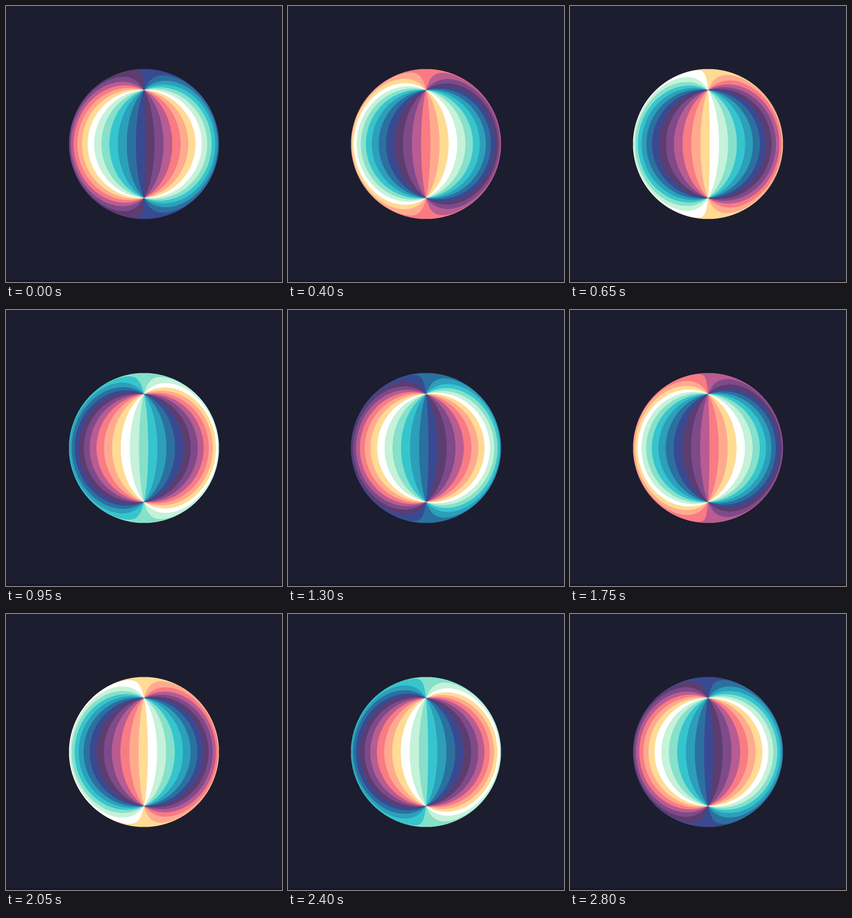
An HTML page with a canvas for the animation above (2.85 s loop, 480 by 480 pixels).

```html
<!DOCTYPE html>
<html lang="en">
<head>
<meta charset="utf-8">
<title>Striped mirror ball</title>
<style>
  html, body { margin: 0; width: 100%; height: 100%; overflow: hidden; background: #1c1d2f; }
  canvas { display: block; width: 480px; height: 480px; }
</style>
</head>
<body>
<canvas id="stage" width="480" height="480"></canvas>
<script>
const SIZE = 480, MID = SIZE / 2, RADIUS = 130.5;
const STEP_MS = 50, STEPS = 57;
const SUB = 3, SAMPLES = SUB * SUB;
const CAMERA = 20;       // camera distance in ball radii
const PHASE = -0.12;     // start offset in stripes
const BACK = '#1c1d2f', FOOT = '#1b1328';
const rgb = hex => [1, 3, 5].map(i => parseInt(hex.slice(i, i + 2), 16));
const backRgb = rgb(BACK);
const palette = [
  '#5c3d70', '#7e4a8a', '#b85c92', '#f97b84', '#ffaa8f', '#ffdb94', '#ffffff',
  '#c5f2d9', '#86e0ca', '#36c5cd', '#2c9fbb', '#2a719f', '#394a92'
].map(rgb);
const N = palette.length;

const ctx = document.getElementById('stage').getContext('2d');
ctx.fillStyle = BACK;
ctx.fillRect(0, 0, SIZE, SIZE);
ctx.fillStyle = FOOT;
ctx.fillRect(0, 477, SIZE, 3);

// Longitude, in stripes, of the ray mirrored by the ball; NaN off the ball.
function stripeAt(px, py) {
  const scale = 1 / (RADIUS * Math.sqrt(CAMERA * CAMERA - 1));
  const u = (px - MID) * scale, v = (py - MID) * scale;
  const len = Math.sqrt(u * u + v * v + 1);
  const dx = u / len, dy = v / len, dz = -1 / len;
  const b = CAMERA * dz;
  const disc = b * b - CAMERA * CAMERA + 1;
  if (disc < 0) return NaN;
  const t = -b - Math.sqrt(disc);
  const nx = t * dx, ny = t * dy, nz = CAMERA + t * dz;
  const k = 2 * (dx * nx + dy * ny + dz * nz);
  return Math.atan2(dx - k * nx, dz - k * nz) * N / Math.PI;
}

const left = Math.floor(MID - RADIUS) - 1;
const side = SIZE - 2 * left;
const image = ctx.createImageData(side, side);
const stripes = new Float32Array(side * side * SAMPLES);
for (let i = 0; i < stripes.length; i++) {
  const pixel = Math.floor(i / SAMPLES), s = i % SAMPLES;
  const x = left + pixel % side + (s % SUB + 0.5) / SUB;
  const y = left + Math.floor(pixel / side) + (Math.floor(s / SUB) + 0.5) / SUB;
  stripes[i] = stripeAt(x, y);
}

function draw(step) {
  const shift = step * 2 * N / STEPS + PHASE + 2 * N;
  for (let p = 0, i = 0; p < image.data.length; p += 4) {
    let r = 0, g = 0, b = 0;
    for (let s = 0; s < SAMPLES; s++, i++) {
      const stripe = stripes[i];
      const c = stripe === stripe ? palette[Math.floor(stripe + shift) % N] : backRgb;
      r += c[0];
      g += c[1];
      b += c[2];
    }
    image.data[p] = r / SAMPLES;
    image.data[p + 1] = g / SAMPLES;
    image.data[p + 2] = b / SAMPLES;
    image.data[p + 3] = 255;
  }
  ctx.putImageData(image, left, left);
}

const start = performance.now();
let shown = -1;
function tick() {
  const elapsed = Math.max(0, performance.now() - start);
  const step = Math.floor(elapsed / STEP_MS) % STEPS;
  if (step !== shown) draw(shown = step);
  requestAnimationFrame(tick);
}
tick();
</script>
</body>
</html>
```
